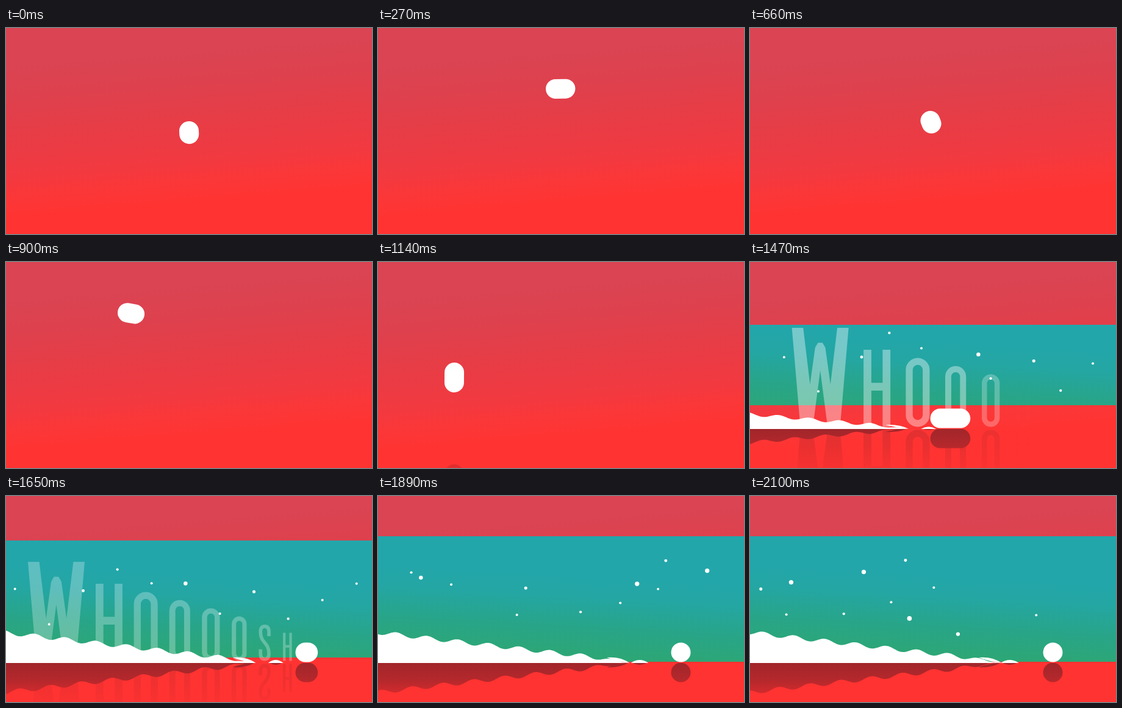
An HTML page with a canvas that plays this animation: 600x338 px, repeating every 2130 ms.

```html
<!DOCTYPE html>
<html lang="en">
<head>
<meta charset="utf-8">
<title>Whoosh</title>
<style>
html, body { margin: 0; width: 100%; height: 100%; overflow: hidden; background: #ff3331; }
canvas { display: block; }
</style>
</head>
<body>
<canvas id="stage" width="600" height="338" role="img" aria-label="Whoooosh"></canvas>
<script>
const ctx = document.getElementById('stage').getContext('2d');
const W = 600, H = 338, LOOP = 2130;
const GROUND = 273, REST = 256.5, SHUTTER = 21;
const clamp = v => Math.max(0, Math.min(1, v));

function gradient(x0, y0, x1, y1, ...stops) {
  const g = ctx.createLinearGradient(x0, y0, x1, y1);
  for (const [pos, color] of stops) g.addColorStop(pos, color);
  return g;
}
const redFill = gradient(291, 40, 311, 290,
  [0, '#da4453'], [.25, '#df404c'], [.5, '#e93c45'], [.72, '#f23940'], [.85, '#fb3738'], [1, '#ff3331']);
const tealFill = gradient(304, 125, 296, 275,
  [0, '#23a6aa'], [.25, '#24a6a4'], [.6, '#28a588'], [1, '#2ea770']);
// Used in mirrored space, so it fades with depth below the ground
const mirrorFill = gradient(0, GROUND, 0, 205,
  [0, '#a0262a'], [.45, '#b6282c'], [.7, 'rgba(190,40,44,.75)'], [1, 'rgba(190,40,44,.35)']);

const bezier = (u, a, b, c, d) => {
  const v = 1 - u;
  return v * v * v * a + 3 * v * v * u * b + 3 * v * u * u * c + u * u * u * d;
};
const quadInOut = p => p < .5 ? 2 * p * p : 1 - 2 * (1 - p) * (1 - p);

// Widening loop, leap to the left, then a dash to the right
function ballAt(t) {
  if (t < 540) {
    const p = clamp(t / 540), angle = 2 * Math.PI * p * p * (3 - 2 * p);
    const r = 25 + 20 * Math.sqrt(Math.sin(Math.PI * p));
    return [300 + r * Math.sin(angle), 144 + r * Math.cos(angle)];
  }
  if (t < 1245) {
    const p = (t - 540) / 705, u = p * p * (2.7 - 1.7 * p);
    return [bezier(u, 300, 298, 90, 130), bezier(u, 169, 105, -25, REST)];
  }
  return [130 + 366.5 * quadInOut(clamp((t - 1243) / 437)), REST];
}

function drawBall(t, color) {
  ctx.strokeStyle = color;
  ctx.lineWidth = 32;
  ctx.lineCap = 'round';
  ctx.beginPath();
  ctx.moveTo(...ballAt(t - SHUTTER / 2));
  const [x, y] = ballAt(t + SHUTTER / 2);
  ctx.lineTo(x + .01, y);
  ctx.stroke();
}

function drawWave(t, color) {
  const grow = clamp((t - 1300) / 230);
  if (!grow) return;
  const end = ballAt(t)[0] * .91 - 41, base = GROUND + 1;
  const crest = 22 - .28 * (t - 2100);
  ctx.fillStyle = color;
  ctx.beginPath();
  ctx.moveTo(0, base);
  for (let x = 0; x <= end; x += 2) {
    const left = end - x, ripple = 3 + 3.6 * Math.cos((x - crest) * 2 * Math.PI / 50.5);
    ctx.lineTo(x, base - grow * (left * .115 + Math.min(1, left / 60) * ripple));
  }
  ctx.lineTo(end, base);

  // curling tip and the ripple ahead of it
  ctx.moveTo(end - 36, base - 9 * grow);
  ctx.quadraticCurveTo(end - 14, base - 11 * grow, end + 2, base);
  ctx.quadraticCurveTo(end - 18, base - 2, end - 36, base - 9 * grow);
  const e = Math.min(1, Math.exp((1650 - t) / 150));
  const from = end - 1 + 23 * e, to = end + 29 + 18 * e;
  ctx.moveTo(from, base);
  ctx.quadraticCurveTo((from + to) / 2, base - 10 * grow, to, base);
  ctx.fill();
}

// Left half of the W, from the lower middle notch round to the upper apex
const halfW = [[.5, .43], [.37, 1], [.15, 1], [0, 0], [.2, 0], [.32, .57], [.41, .2], [.46, .15]];
const shapeW = [...halfW, ...halfW.map(([x, y]) => [1 - x, y]).reverse()];

function drawLetter(ch, x, w, top, bottom) {
  const h = bottom - top, s = w * .29;
  const l = x + s / 2, r = x + w - s / 2, c = x + w / 2;
  const y = f => top + h * f;
  ctx.beginPath();
  ctx.lineWidth = s;
  ctx.lineCap = 'butt';
  if (ch === 'W') {
    for (const [px, py] of shapeW) ctx.lineTo(x + px * w, y(py));
    ctx.fill();
    return;
  }
  if (ch === 'H') {
    for (const side of [l, r]) {
      ctx.moveTo(side, top);
      ctx.lineTo(side, bottom);
    }
    ctx.moveTo(l, y(.48));
    ctx.lineTo(r, y(.48));
  } else if (ch === 'O') {
    ctx.roundRect(l, top + s / 2, w - s, h - s, (w - s) / 2);
  } else {
    const t = top + s / 2, b = bottom - s / 2;
    ctx.moveTo(r, y(.32));
    ctx.lineTo(r, y(.2));
    ctx.quadraticCurveTo(r, t, c, t);
    ctx.quadraticCurveTo(l, t, l, y(.2));
    ctx.bezierCurveTo(l, y(.52), r, y(.48), r, y(.8));
    ctx.quadraticCurveTo(r, b, c, b);
    ctx.quadraticCurveTo(l, b, l, y(.8));
    ctx.lineTo(l, y(.68));
  }
  ctx.stroke();
}

// A big initial, then letters that shrink and close up towards the right
function drawWord(t, color, strength) {
  const fade = clamp((1780 - t) / 180);
  if (!fade) return;
  const spread = (Math.exp((1470 - t) / 112) - .2) / .8;
  ctx.fillStyle = ctx.strokeStyle = color;
  [...'WHOOOOSH'].forEach((ch, i) => {
    const k = i - 1;
    const x = i ? 147 + 65 * k - 2.3 * k * k : 36;
    const w = i ? 44 - 4.9 * k : 93;
    const top = i ? 144 + 13.4 * k : 108;
    ctx.globalAlpha = strength * fade * clamp((t - 1330) / 60) * clamp((t - 1245 - 45 * i) / 70);
    drawLetter(ch, x + (33 + 6.6 * i) * spread, w, top, GROUND - 2.5);
  });
  ctx.globalAlpha = 1;
}

let seed = 11;
const random = () => (seed = seed * 16807 % 2147483647) / 2147483647;
const flakes = Array.from({ length: 17 }, (_, i) => {
  const speed = .8 + random() ** 2 * 1.1;
  return { x: 15 + 56 * i, y: 90 + 140 * random(), r: .6 + 1.7 * speed, speed, drift: 24 * (random() - .5) };
});

function drawPanel(t) {
  const half = Math.round(103.5 * (1 - Math.exp((1360 - t) / 110)));
  if (half <= 0) return;
  ctx.save();
  ctx.beginPath();
  ctx.rect(0, 169 - half, W, 2 * half);
  ctx.clip();
  ctx.fillStyle = tealFill;
  ctx.fillRect(0, 0, W, H);
  const s = t - 1650, run = .42 * s + .00075 * s * s;
  ctx.fillStyle = '#fff';
  for (const f of flakes) {
    ctx.beginPath();
    ctx.arc(f.x - f.speed * run, f.y + f.drift * Math.sin(s / 190), f.r, 0, 7);
    ctx.fill();
  }
  ctx.restore();
}

function draw(t) {
  ctx.fillStyle = redFill;
  ctx.fillRect(0, 0, W, H);
  drawPanel(t);

  if (t > 1085) {
    ctx.save();
    ctx.beginPath();
    ctx.rect(0, GROUND + 1, W, H);
    ctx.clip();
    ctx.transform(1, 0, 0, -1, 0, 2 * GROUND);
    drawWord(t, mirrorFill, .3);
    drawWave(t, mirrorFill);
    drawBall(t, mirrorFill);
    ctx.restore();
  }

  drawWord(t, '#fff', .38);
  drawWave(t, '#fff');
  drawBall(t, '#fff');
}

const start = performance.now();
function tick() {
  draw((performance.now() - start) % LOOP);
  requestAnimationFrame(tick);
}
tick();
</script>
</body>
</html>
```
